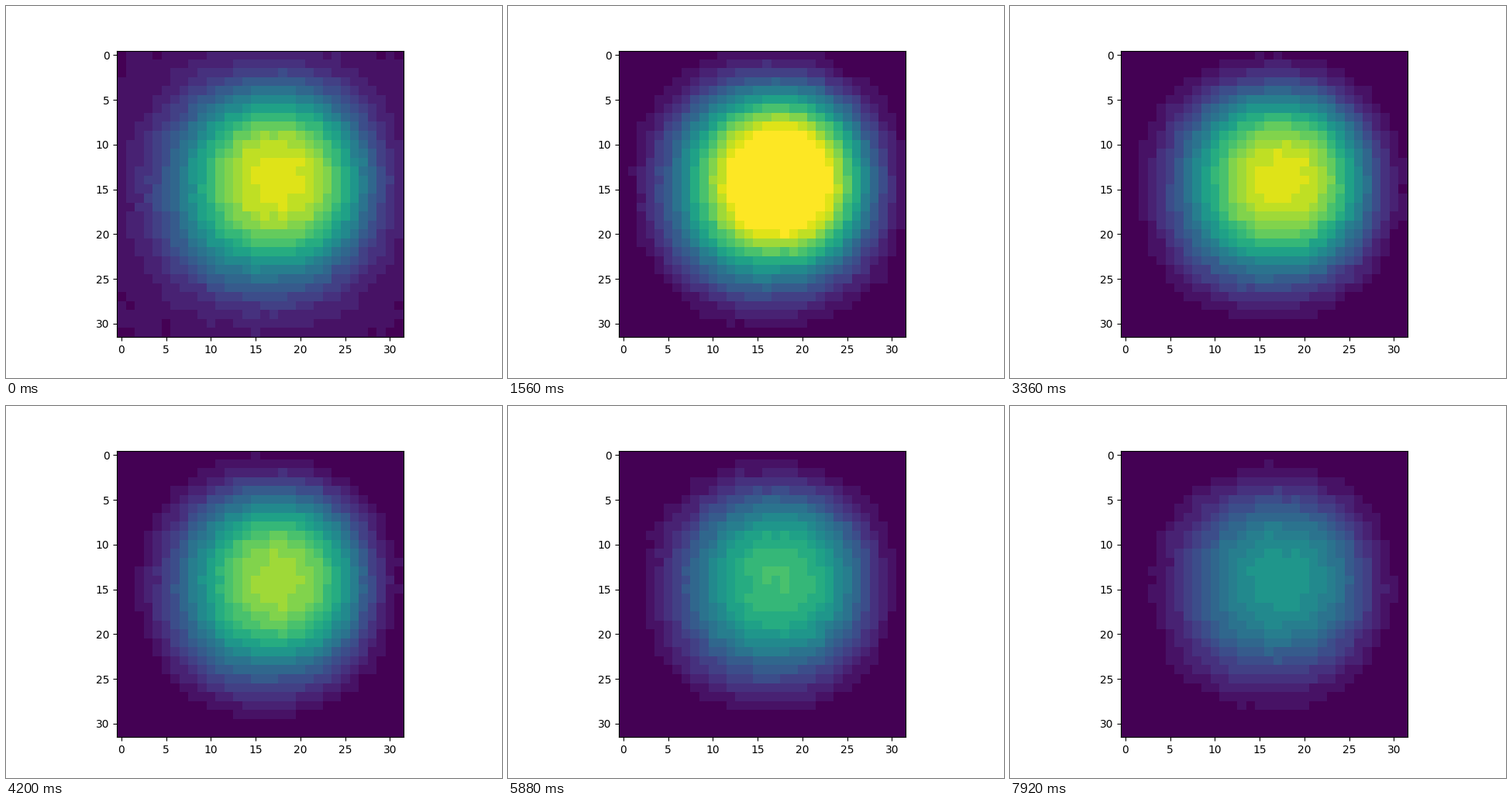
Animation, 640 px wide and 480 px high, one loop 8 s. Source, as a matplotlib script:

```python
import numpy as np
import matplotlib.pyplot as plt
from matplotlib.animation import FuncAnimation

SIZE = 32
LEVELS = 21          # whole sensor counts between black and full scale
INTERVAL = 40
HOLD = 3             # ticks per new reading
FRAMES = 200


def make_spot():
    """Soft, slightly squarish blob whose rim leans to the lower left."""
    y, x = np.mgrid[:SIZE, :SIZE].astype(float)
    x -= 17.5
    y -= 13.9
    lean = np.minimum(np.hypot(x, y) / 14, 1) ** 2
    x = np.abs(x + 1.2 * lean)
    y = np.abs(y - 0.9 * lean)
    dist = (x ** 2.2 + y ** 2.2) ** (1 / 2.2)
    return np.exp(-(dist / 10.5) ** 2.7)


spot = make_spot()
pattern = np.random.default_rng(4).normal(0, 0.005, (SIZE, SIZE))


def reading(step):
    t = step * HOLD * INTERVAL
    heat = 1.5 * np.exp(-t / 7900) - 0.52 * np.exp(-t / 350)
    ambient = 0.088 * np.exp(-t / 900) - 0.04
    noise = np.random.default_rng(100 + step).normal(0, 0.005, (SIZE, SIZE))
    value = heat * spot + ambient * (1 - spot) + pattern + noise
    return np.clip(np.floor(value * LEVELS) / LEVELS, 0, 1)


fig, ax = plt.subplots(figsize=(6.4, 4.8), dpi=100)
image = ax.imshow(reading(0), cmap="viridis", vmin=0, vmax=1)


def update(i):
    image.set_data(reading(i // HOLD))
    return [image]


anim = FuncAnimation(fig, update, frames=FRAMES, interval=INTERVAL,
                     repeat=True, repeat_delay=0)
plt.show()
```
